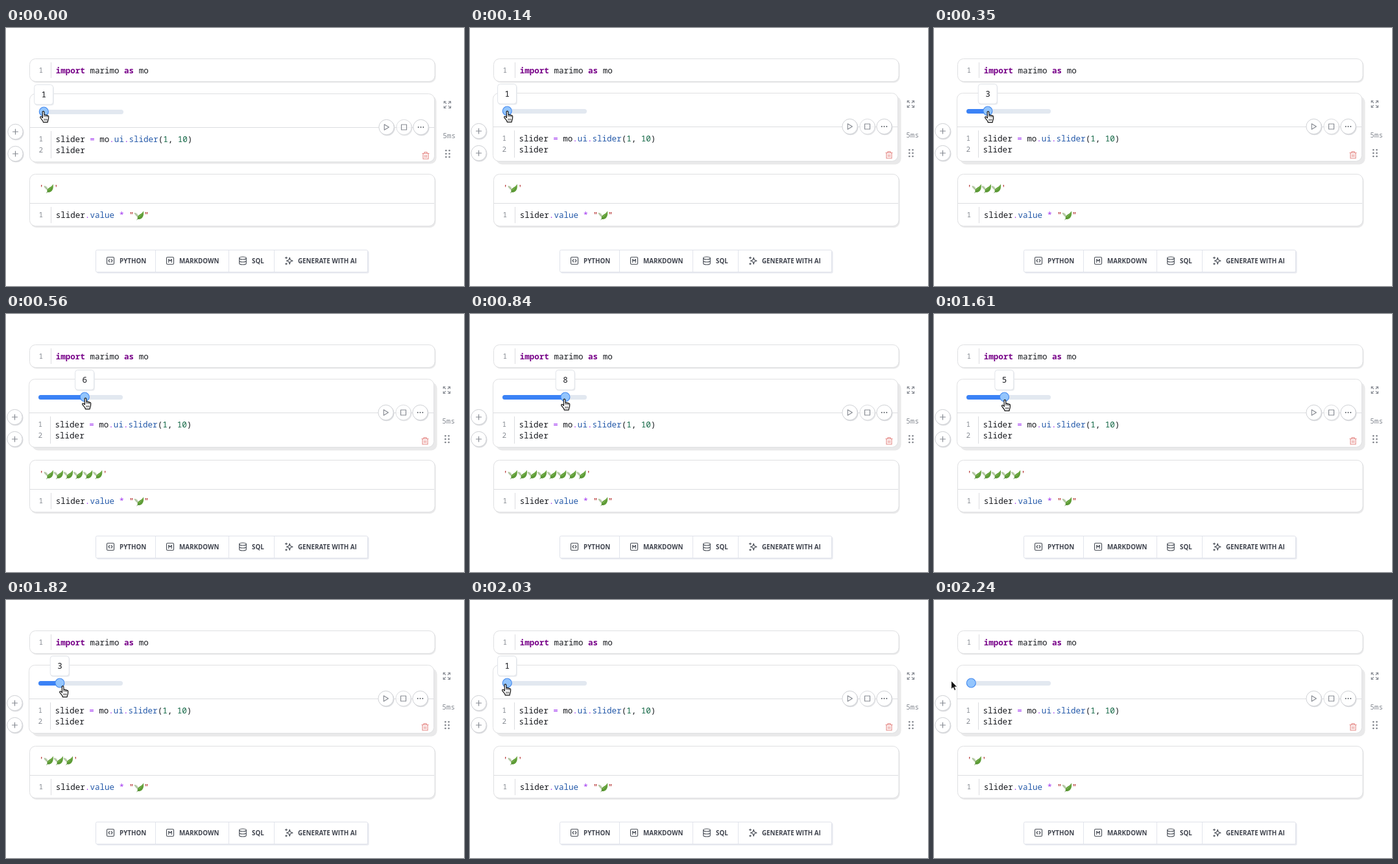
Write an HTML page that moves like this. It is 706 px wide and 398 px high and loops after 2310 ms.

```html
<!DOCTYPE html>
<html lang="en">
<head>
<meta charset="utf-8">
<title>Reactive slider</title>
<style>
  html, body { margin: 0; width: 100%; height: 100%; overflow: hidden; background: #fff; }
  svg { display: block; width: 706px; height: 398px; }
  text { white-space: pre; }
  .code { font: 12.55px "Noto Sans Mono", "DejaVu Sans Mono", monospace; fill: #16181d; }
  .num { font: 11px "Noto Sans Mono", "DejaVu Sans Mono", monospace; fill: #858a92; }
  .kw { fill: #708; font-weight: 600; }
  .op { fill: #a035f0; }
  .prop { fill: #2459a9; }
  .lit { fill: #164; }
  .str { fill: #a11; }
  .label { font: 700 9.8px "Open Sans", "Noto Sans", sans-serif; fill: #41454f; }
  .cell { fill: #fff; stroke: #dfe0e2; }
  .shade { fill: #e9e9ea; }
  .rule { stroke: #dcdde0; fill: none; }
  .icon { fill: none; stroke: #4b5059; stroke-width: 1.15; stroke-linecap: round; stroke-linejoin: round; }
  .dim { stroke: #858991; }
</style>
</head>
<body>
<svg viewBox="0 0 706 398" xmlns="http://www.w3.org/2000/svg">
  <defs>
    <g id="leaf">
      <path d="M.3 3.2C3.2 2.6 6.6 4.3 6.7 9.2 3.6 9.2 1.5 7.2.3 3.2Z" fill="#c9d8bd"/>
      <path d="M1 3.8Q4.5 5.5 6.4 10" fill="none" stroke="#8fab78" stroke-width=".8"/>
      <path d="M14.6.2C15.4 5.8 14.4 11.6 8.8 13 6.3 13.5 4.9 12.2 5.4 9.9 6.5 5.3 12.3 5.4 14.6.2Z" fill="#5d9c35"/>
      <path d="M14.3 2C12.8 6.5 8.2 6.6 6.6 10.6 10 9.8 13.4 7.6 14.3 2Z" fill="#8cc65a"/>
      <path d="M12.8 5.8Q9.2 9.2 4.6 13.6" fill="none" stroke="#3f7627" stroke-width=".9" stroke-linecap="round"/>
    </g>
    <g id="round">
      <circle cx="1" cy="1.2" r="12" fill="#dcdde0"/>
      <circle r="11.7" fill="#fff" stroke="#cfd1d5"/>
    </g>
    <g id="add">
      <use href="#round"/>
      <path class="icon dim" d="M-4 0H4M0-4V4"/>
    </g>
  </defs>

  <rect class="shade" x="38" y="49" width="624.5" height="35.5" rx="9"/>
  <rect class="cell" x="36.5" y="47.5" width="624.5" height="35" rx="9"/>
  <path class="rule" d="M69.5 53V77"/>
  <text class="num" x="50.5" y="68.5">1</text>
  <text class="code" x="76.7" y="70"><tspan class="kw">import</tspan> marimo <tspan class="kw">as</tspan> mo</text>

  <rect class="shade" x="38" y="227" width="624.5" height="81" rx="9"/>
  <rect class="cell" x="36.5" y="225.5" width="624.5" height="80" rx="9"/>
  <path class="rule" d="M37 270.5H660M69.5 276V301"/>
  <text class="code str" x="51" y="251">'</text>
  <g id="leaves"></g>
  <text class="code str" id="endQuote" y="251">'</text>
  <text class="num" x="50.5" y="291.5">1</text>
  <text class="code" x="76.7" y="293">slider<tspan class="op">.</tspan><tspan class="prop">value</tspan> <tspan class="op">*</tspan> <tspan class="str">"</tspan></text>
  <use href="#leaf" x="197.3" y="282"/>
  <text class="code str" x="212.8" y="293">"</text>

  <g id="active">
    <rect class="shade" id="activeShade" x="36" y="101" width="624" height="105" rx="9"/>
    <rect class="cell" x="35.5" y="100.5" width="624" height="105" rx="9"/>
    <path class="rule" d="M36 152.5H659M68.5 158V200"/>
    <text class="num" x="49.5" y="173.5">1</text>
    <text class="num" x="49.5" y="190.5">2</text>
    <text class="code" x="75.5" y="175">slider <tspan class="op">=</tspan> mo<tspan class="op">.</tspan><tspan class="prop">ui</tspan><tspan class="op">.</tspan><tspan class="prop">slider</tspan>(<tspan class="lit">1</tspan>, <tspan class="lit">10</tspan>)</text>
    <text class="code" x="75.5" y="192">slider</text>

    <use href="#add" x="13.5" y="159"/>
    <use href="#add" x="13.5" y="193"/>
    <use href="#round" x="585.5" y="152"/>
    <path class="icon dim" d="M582.2 147.7V156.3L589.3 152Z"/>
    <g opacity=".75"><use href="#round" x="612.5" y="152"/></g>
    <rect class="icon dim" x="608.5" y="148" width="8" height="8"/>
    <use href="#round" x="638.5" y="152"/>
    <path d="M634.7 152h.01M638.5 152h.01M642.3 152h.01" stroke="#555a62" stroke-width="1.9" stroke-linecap="round"/>
    <path class="icon" style="stroke:#e58b88" d="M641 192.5H651M642 192.5V201H650V192.5M644 192.3V190.5H648V192.3M644.8 195V198.7M647.2 195V198.7"/>
    <path class="icon dim" d="M674.2 115V112.2H677M674.2 112.2L677.5 115.5M681.5 112.2H684.5V115M684.5 112.2L681.2 115.5M674.2 119.5V122.5H677M674.2 122.5L677.5 119.2M681.5 122.5H684.5V119.5M684.5 122.5L681.2 119.2"/>
    <text class="num" x="672.2" y="169">5ms</text>
    <path d="M677.3 188h.01M682.5 188h.01M677.3 193h.01M682.5 193h.01M677.3 198h.01M682.5 198h.01" stroke="#80848b" stroke-width="2.7" stroke-linecap="round"/>

    <rect x="50" y="125" width="130" height="7" rx="3.5" fill="#e2e8f0"/>
    <rect id="fill" x="50" y="125" height="7" rx="3.5" fill="#3b82f6"/>
    <g id="thumb">
      <circle cy="128" r="7" fill="#93c5fd" stroke="#4288ee" stroke-width="1.1"/>
      <g id="tip">
        <rect x="-14" y="88" width="29.5" height="30.5" rx="4" fill="#e9ebef"/>
        <rect x="-14.7" y="86.5" width="29" height="30.5" rx="4" fill="#fff" stroke="#e1e4e9"/>
        <text class="code" id="tipText" y="106" text-anchor="middle"></text>
      </g>
    </g>
  </g>

  <rect x="140" y="344" width="419.5" height="34.5" rx="2" fill="#e8eaf0"/>
  <rect x="138.5" y="342.5" width="419" height="34" rx="2" fill="#fff" stroke="#dfe2ea"/>
  <path d="M230.5 343V376M343.5 343V376M413.5 343V376" stroke="#e2e5ec"/>
  <g class="icon">
    <rect x="155.5" y="353.5" width="11" height="11" rx="1.5"/>
    <path d="M159.8 357L158 359 159.8 361M162.2 357L164 359 162.2 361"/>
    <rect x="247.5" y="353.5" width="11" height="11" rx="1.5"/>
    <path d="M250.7 361.5V356.7L253 359.3 255.3 356.7V361.5"/>
    <ellipse cx="365" cy="355" rx="5.3" ry="2"/>
    <path d="M359.7 355V363C359.7 365.7 370.3 365.7 370.3 363V355M359.7 359C359.7 361.7 370.3 361.7 370.3 359"/>
    <path d="M437.2 354.2L438.4 357.8 442 359.2 438.4 360.5 437.2 364.2 436 360.5 432.4 359.2 436 357.8ZM432 353V356M430.5 354.5H433.5M432 362.5V365M430.8 363.8H433.2"/>
  </g>
  <text class="label" x="175" y="363">PYTHON</text>
  <text class="label" x="267" y="363">MARKDOWN</text>
  <text class="label" x="379" y="363">SQL</text>
  <text class="label" x="450" y="363">GENERATE WITH AI</text>

  <g id="hand" stroke-linejoin="round">
    <path d="M-.8 1.8C-.8.3 1.7.3 1.8 1.8L2.1 6.6C2.5 5.8 4.1 5.9 4.4 7 5 6.3 6.4 6.6 6.6 7.7 7.4 7.1 8.7 7.5 8.7 8.9L8.5 12.4C8.3 14.5 7.3 15 7.2 17.6H.4C.2 15.2-2.2 13.6-4.1 10.6-4.9 9.2-3.2 8.2-2 9.4L-.5 10.9Z" fill="#fff" stroke="#111" stroke-width="1.2"/>
    <path d="M2.1 6.6V9.5M4.4 7.2V9.8M6.6 7.8V10.1M2 12.2V15.2M4 12.2V15.2M6 12.2V15.2" stroke="#111" stroke-width=".8"/>
  </g>
  <path id="arrow" d="M0 0V13.2L3 10.4 5 15 7.3 14 5.3 9.6H9.3Z" fill="#111" stroke="#fff" stroke-width=".9"/>
</svg>
<script>
  const LOOP = 2310, STEP = 70, RELEASE = 2100;
  const TRACK_START = 57.3, TICK = 12.8, LEAF_WIDTH = 15.1;
  const el = id => document.getElementById(id);

  // Pointer path: time, x, y
  const path = [
    [0, 57, 127.7], [140, 57, 127.5], [560, 122, 129], [840, 145, 130.5],
    [1100, 157, 131], [1400, 128, 131], [1820, 87, 132],
    [RELEASE, 43, 128], [2240, 26.5, 124.5]
  ];

  const leaves = Array.from({ length: 10 }, (_, i) => {
    const leaf = document.createElementNS("http://www.w3.org/2000/svg", "use");
    leaf.setAttribute("href", "#leaf");
    leaf.setAttribute("x", 58 + i * LEAF_WIDTH);
    leaf.setAttribute("y", 240.5);
    return el("leaves").appendChild(leaf);
  });

  function slope(i, axis) {
    if (i < 2 || i === path.length - 1) return 0;
    const a = path[i - 1], b = path[i + 1];
    return (b[axis] - a[axis]) / (b[0] - a[0]);
  }

  function pointer(t, axis) {
    const last = path.length - 1;
    if (t >= path[last][0]) return path[last][axis];
    const i = path.findIndex(p => p[0] > t) - 1;
    const a = path[i], b = path[i + 1], span = b[0] - a[0], u = (t - a[0]) / span;
    const ease = u * u * (3 - 2 * u);
    return a[axis] + (b[axis] - a[axis]) * ease
      + span * u * (1 - u) * ((1 - u) * slope(i, axis) - u * slope(i + 1, axis));
  }

  const move = (id, x, y) => el(id).setAttribute("transform", `translate(${x} ${y})`);
  const show = (node, on) => node.setAttribute("visibility", on ? "inherit" : "hidden");

  function draw(time) {
    const t = Math.floor((time % LOOP) / STEP) * STEP;
    const x = pointer(t, 1), y = pointer(t, 2);
    const value = Math.min(10, Math.max(1, Math.round((x - TRACK_START) / TICK) + 1));
    const thumbX = TRACK_START + (value - 1) * TICK;
    const dragging = t < RELEASE;

    // The hovered cell lifts away from its shadow.
    const rest = t < STEP ? 1 : 0;
    move("active", rest, rest);
    move("activeShade", 4.5 - 2 * rest, 4.5 - 2 * rest);

    move("thumb", thumbX, 0);
    el("fill").setAttribute("width", value > 1 ? thumbX - 50 : 0);
    el("tipText").textContent = value;
    show(el("tip"), dragging);

    leaves.forEach((leaf, i) => show(leaf, i < value));
    el("endQuote").setAttribute("x", 58.3 + value * LEAF_WIDTH);

    move("hand", x, y);
    move("arrow", x, y);
    show(el("hand"), dragging);
    show(el("arrow"), !dragging);
  }

  const start = performance.now();
  function tick() {
    draw(performance.now() - start);
    requestAnimationFrame(tick);
  }
  tick();
</script>
</body>
</html>
```
